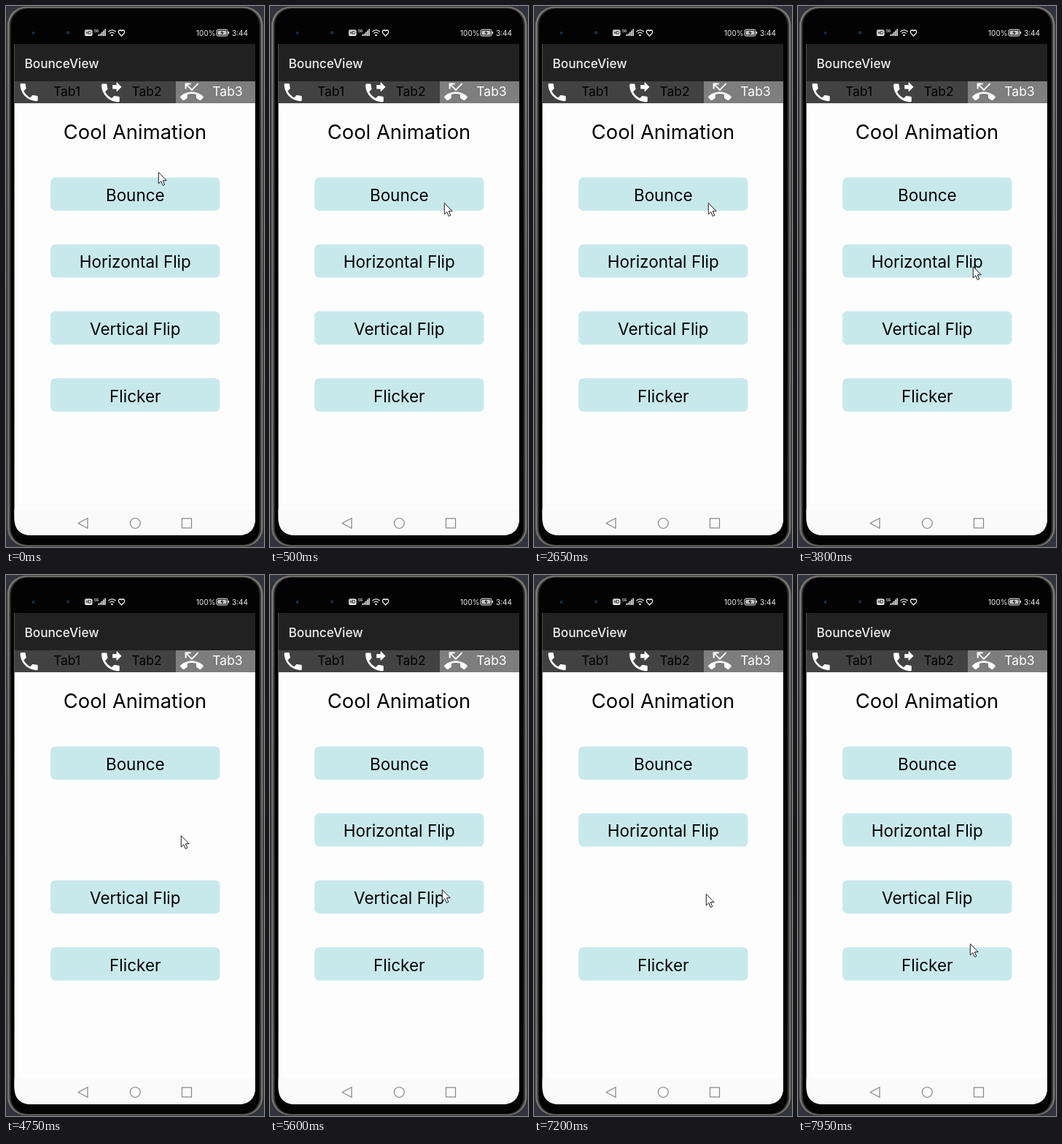
Animation of 354 by 740 pixels, one loop 8 s. Source, as an HTML page:

```html
<!DOCTYPE html>
<html lang="en">
<head>
<meta charset="utf-8">
<title>Cool Animation</title>
<style>
  html, body { margin: 0; width: 100%; height: 100%; overflow: hidden; background: #31343e; }
  svg { display: block; width: 354px; height: 740px; }
  text { font-family: Inter, Roboto, sans-serif; }
  .mid { text-anchor: middle; }
</style>
</head>
<body>
<svg viewBox="0 0 354 740" xmlns="http://www.w3.org/2000/svg">
  <defs>
    <linearGradient id="rim" x1="0" y1="0" x2="0" y2="1">
      <stop offset="0" stop-color="#7d7a75"/>
      <stop offset=".5" stop-color="#696764"/>
      <stop offset="1" stop-color="#75726e"/>
    </linearGradient>
    <path id="phone" d="M6.62 10.79c1.44 2.83 3.76 5.14 6.59 6.59l2.2-2.2c.27-.27.67-.36 1.02-.24 1.12.37 2.33.57 3.57.57.55 0 1 .45 1 1V20c0 .55-.45 1-1 1-9.39 0-17-7.61-17-17 0-.55.45-1 1-1h3.5c.55 0 1 .45 1 1 0 1.25.2 2.45.57 3.57.11.35.03.74-.25 1.02z"/>
  </defs>

  <!-- body -->
  <rect width="354" height="740" fill="#31343e"/>
  <rect x="0.5" y="0" width="353" height="740" rx="26" fill="#343332"/>
  <rect x="2" y="1" width="350.500" height="738" rx="25" fill="url(#rim)"/>
  <rect x="4.500" y="2.500" width="345.500" height="735.500" rx="24" fill="#383736"/>
  <rect x="6.500" y="3.500" width="341.500" height="733.500" rx="23" fill="#030303"/>
  <path d="M11.500 52H342V700Q342 724 318 724H35.500Q11.500 724 11.500 700Z" fill="#fdfdfd"/>
  <path d="M11.500 689H342V700Q342 724 318 724H35.500Q11.500 724 11.500 700Z" fill="#fafafa"/>
  <circle cx="37.500" cy="37" r="2" fill="#10304c"/>
  <circle cx="85" cy="36.500" r="2.500" fill="#0e2a44"/>

  <!-- status bar -->
  <g fill="#f2f2f2">
    <rect x="108" y="32.500" width="10.500" height="8.500" rx="2"/>
    <text x="113.200" y="39" font-size="5.500" font-weight="700" fill="#111" class="mid">HD</text>
    <text x="121" y="36" font-size="4.500" font-weight="700">5G</text>
    <path d="M126.500 39h1.500v2h-1.500zM128.700 37.500h1.500v3.500h-1.500zM130.900 35.500h1.500v5.500h-1.500zM133.100 33.500h1.500v7.500h-1.500zM135.300 31.500h1.500v9.500h-1.500z"/>
    <circle cx="145.500" cy="40" r="1.300"/>
    <g fill="none" stroke="#f2f2f2" stroke-width="1.300">
      <path d="M140.300 35.200Q145.500 30.500 150.700 35.200M142.400 37.500Q145.500 34.700 148.600 37.500"/>
      <path d="M158.500 41L154.700 37Q153.500 33.500 156.500 33Q158 33 158.500 34Q159 33 160.500 33Q163.500 33.500 162.300 37Z"/>
      <rect x="289" y="32.200" width="15" height="8.800" rx="2" stroke-width="1"/>
    </g>
    <rect x="290.500" y="33.700" width="12" height="5.800" rx="1" fill="#c8c8c8"/>
    <rect x="304.700" y="35" width="1.400" height="3.300"/>
    <path d="M297.300 33.300L294 37.200H296.300L295.600 40L299 36H296.700Z" fill="#222"/>
    <text x="261" y="40.500" font-size="10">100%</text>
    <text x="310" y="40.500" font-size="10">3:44</text>
  </g>

  <!-- title and tabs -->
  <rect x="11.500" y="52" width="330.500" height="51" fill="#212121"/>
  <text x="25.500" y="85" font-size="17.200" font-weight="500" fill="#f0f0f0">BounceView</text>
  <rect x="11.500" y="103" width="222" height="30" fill="#424242"/>
  <rect x="233" y="103" width="109" height="30" fill="#7e7e7e"/>
  <g fill="#fff">
    <use href="#phone" transform="translate(15.500 102) scale(1.340)"/>
    <g transform="translate(127 102.500) scale(1.370)">
      <use href="#phone"/>
      <path d="M18 11l5-5-5-5v3h-4v4h4v3z"/>
    </g>
    <path transform="translate(239 101.500) scale(1.330)" d="M6.500 5.500L12 11l7-7-1-1-6 6-4.500-4.500H11V3H5v6h1.500V5.500zm17.210 11.170C20.660 13.780 16.540 12 12 12 7.460 12 3.340 13.780.29 16.670c-.18.18-.29.43-.29.71s.11.53.29.7l2.480 2.480c.18.18.43.29.71.29.27 0 .52-.11.7-.28.79-.74 1.690-1.360 2.660-1.850.33-.16.56-.5.56-.9v-3.100c1.450-.48 3-.73 4.600-.73 1.600 0 3.150.25 4.600.72v3.100c0 .39.23.74.56.9.98.49 1.870 1.120 2.670 1.850.18.18.43.28.7.28.28 0 .53-.11.71-.29l2.480-2.480c.18-.18.29-.43.29-.71s-.12-.52-.3-.7z"/>
  </g>
  <g font-size="17.500" class="mid">
    <text x="83.500" y="123">Tab1</text>
    <text x="193" y="123">Tab2</text>
    <text x="304" y="123" fill="#fff">Tab3</text>
  </g>

  <text x="177" y="182" font-size="27.400" class="mid">Cool Animation</text>
  <g id="buttons"></g>

  <!-- navigation bar -->
  <g fill="none" stroke="#858585" stroke-width="1.200">
    <path d="M99 707.500L112 700.500V714.500Z" stroke-linejoin="round"/>
    <circle cx="177.300" cy="707.500" r="7"/>
    <rect x="241.500" y="701" width="13" height="13"/>
  </g>

  <path id="cursor" d="M0.300 0.500V16L3.800 12.700L6.300 18.500L8.800 17.400L6.300 11.700H11.200Z" fill="#fff" stroke="#1c1c22" stroke-width="1"/>
</svg>
<script>
const LOOP = 8000, STEP = 50;

const buttons = ["Bounce", "Horizontal Flip", "Vertical Flip", "Flicker"].map((label, i) => {
  const g = document.createElementNS("http://www.w3.org/2000/svg", "g");
  g.innerHTML = `<rect x="-116.200" y="-22.800" width="232.400" height="45.600" rx="6.500" fill="#c8e9ec"/>
    <text y="9.500" font-size="22.500" class="mid">${label}</text>`;
  document.getElementById("buttons").append(g);
  return { g, y: 257.2 + i * 91.6 };
});
const cursor = document.getElementById("cursor");

// Each key is [time, ...values], eased between neighbours.
function at(keys, t) {
  if (t <= keys[0][0]) return keys[0].slice(1);
  for (let i = 1; i < keys.length; i++) {
    const a = keys[i - 1], b = keys[i];
    if (t <= b[0]) {
      const u = (t - a[0]) / (b[0] - a[0]), e = u * u * (3 - 2 * u);
      return a.slice(1).map((v, k) => v + (b[k + 1] - v) * e);
    }
  }
  return keys[keys.length - 1].slice(1);
}

const bounce = [[2100, 1], [2200, .9], [2400, .9], [2500, 1.11], [2600, 1]];
// Values: the flipped axis, then the other axis; times count from the press.
const flip = [[0, 1, 1], [100, .9, .9], [200, .9, .9], [250, .95, .95],
  [300, .5, 1], [350, 0, 1], [500, 0, 1], [700, 1, 1]];
const path = [[0, 209, 227], [250, 240, 268], [450, 240, 268], [500, 239, 269],
  [2700, 239, 269], [3000, 240, 356], [5050, 240, 356], [5300, 243, 392],
  [5600, 236, 430], [5750, 236, 436], [7400, 236, 436], [7550, 238, 508],
  [7600, 238, 508], [7950, 236, 504]];

function place(i, sx, sy) {
  const { g, y } = buttons[i];
  g.setAttribute("transform", `translate(177.300 ${y}) scale(${sx} ${sy})`);
  g.setAttribute("visibility", sx * sy < .01 ? "hidden" : "visible");
}

function draw(t) {
  const [s] = at(bounce, t);
  const [hx, hy] = at(flip, t - 4250);
  const [vy, vx] = at(flip, t - 6750);
  place(0, s, s);
  place(1, hx, hy);
  place(2, vx, vy);
  place(3, 1, 1);
  const [x, y] = at(path, t);
  cursor.setAttribute("transform", `translate(${x} ${y})`);
}

const start = performance.now();
function tick(now) {
  const t = Math.max(0, now - start) % LOOP;
  draw(Math.floor(t / STEP) * STEP);
  requestAnimationFrame(tick);
}
draw(0);
requestAnimationFrame(tick);
</script>
</body>
</html>
```
